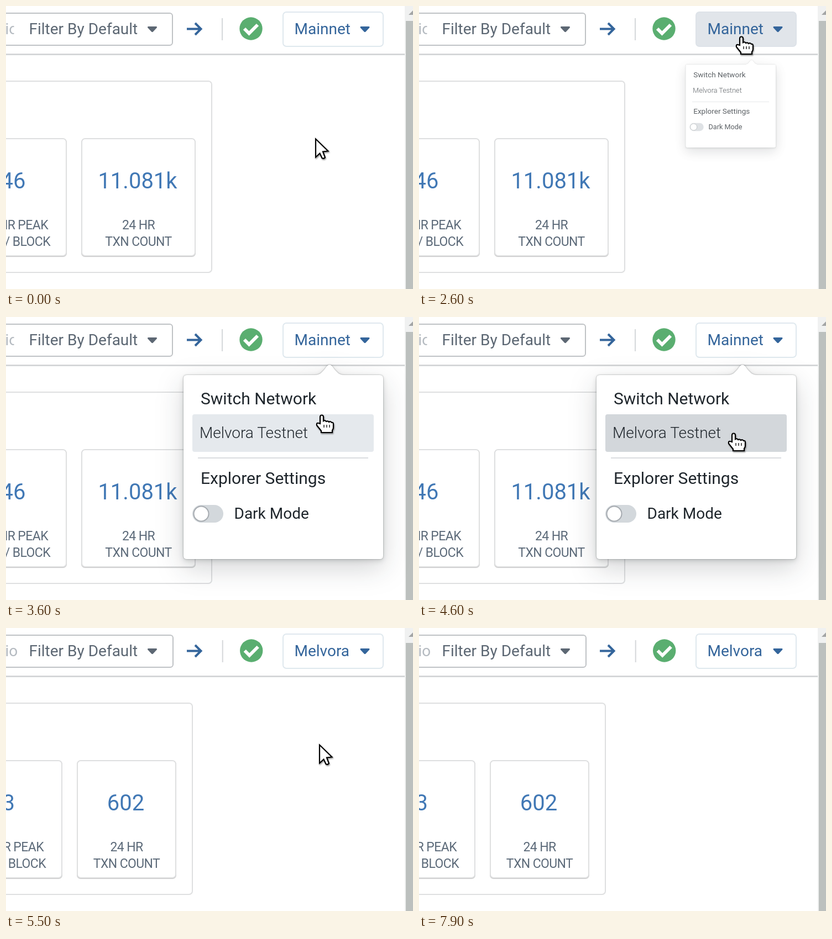
Recreate the animation shown at these times as an HTML page. Size 736 by 512 pixels, loop 8.6 s.

```html
<!DOCTYPE html>
<html lang="en">
<head>
<meta charset="utf-8">
<title>Network switch</title>
<style>
  html, body { margin: 0; width: 100%; height: 100%; overflow: hidden; background: #fff; }
  svg { display: block; font: 28px Roboto, sans-serif; }
  .box { fill: #fff; stroke: #dedfe0; stroke-width: 2; }
  .card { filter: drop-shadow(0 1px 0.5px rgba(0, 0, 0, .22)); }
  .num { font-size: 40px; fill: #4178b5; }
  .label { font-size: 23px; letter-spacing: -.6px; fill: #5c6a79; }
  .mid { text-anchor: middle; }
  .end { text-anchor: end; }
  .grey { fill: #5c6773; }
  .blue { fill: #34659b; }
  #panel { fill: #1f262c; }
  #panel .head { font-size: 30px; }
  #sheet { fill: #fff; filter: drop-shadow(0 0 1px rgba(16, 22, 26, .4)) drop-shadow(0 3px 4px rgba(16, 22, 26, .16)) drop-shadow(0 16px 24px rgba(16, 22, 26, .18)); }
  #cursor { fill: #fff; stroke: #000; stroke-width: 2.2; filter: drop-shadow(1.5px 2px 1px rgba(0, 0, 0, .4)); }
</style>
</head>
<body>
<svg width="736" height="512">
  <defs>
    <path id="caret" d="M1.5 0H15.5Q18 .5 16.5 2.5L10 9.5Q8.500 11 7 9.500L.5 2.500Q-1 .5 1.500 0Z"/>
  </defs>
  <g id="page">
    <g id="cards">
      <rect id="outer" class="box" x="-20" y="136" height="346" rx="6"/>
      <g id="left">
        <rect class="box card" x="-100" y="240" width="209" height="212" rx="6"/>
        <text class="label end" x="76" y="404">24 HR PEAK</text>
        <text class="label end" x="80" y="434">TXN / BLOCK</text>
      </g>
      <rect id="right" class="box card" y="240" height="212" rx="6"/>
      <text id="peak" class="num end" y="330"></text>
      <g id="count" class="mid">
        <text id="total" class="num" x="-1.500" y="330"></text>
        <text class="label" y="404">24 HR</text>
        <text class="label" y="434">TXN COUNT</text>
      </g>
    </g>
    <rect y="86.500" width="721" height="2" fill="#c3c6c8"/>
    <rect y="88.500" width="721" height="1" fill="#eceded"/>
    <rect id="filter" x="-20" y="13" height="58" rx="5" fill="#fff" stroke="#bfc2c5" stroke-width="2"/>
    <text x="-1.500" y="51" fill="#b4bac0">io</text>
    <rect id="cover" y="15" width="24" height="54" fill="#fff"/>
    <text class="grey" x="41.500" y="51">Filter By Default</text>
    <use class="grey" href="#caret" x="256" y="37"/>
    <path d="M327 41.500H352M342 31L352.500 41.500L342 52" fill="none" stroke="#34659b" stroke-width="4"/>
    <g id="status">
      <rect x="390" y="22" width="2" height="40" fill="#d5d8da"/>
      <circle cx="443" cy="41" r="20.700" fill="#5aae70"/>
      <path d="M431 41L439.500 49.500L455 34" fill="none" stroke="#fff" stroke-width="6"/>
    </g>
    <rect id="button" x="501" y="11" width="181" height="62" rx="6" stroke-width="2"/>
    <text id="network" class="blue" x="521.500" y="51"></text>
    <use class="blue" href="#caret" x="640.500" y="37"/>
    <rect x="721" width="15" height="512" fill="#f0f1f1"/>
    <rect x="723" y="27" width="13" height="485" fill="#bcc0be"/>
    <path d="M728 16L736 8V16Z" fill="#a3a5a5"/>
  </g>
  <g id="panel">
    <path id="sheet" d="M327 105H558C567 105 571 101 578 92Q585 81 592 92C599 101 603 105 612 105H676Q682 105 682 111V432Q682 438 676 438H327Q321 438 321 432V111Q321 105 327 105Z"/>
    <rect id="item" x="337" y="176" width="328" height="68" rx="4"/>
    <text class="head" x="352" y="158">Switch Network</text>
    <text x="350" y="219" font-weight="300">Melvora Testnet</text>
    <rect x="347" y="254" width="308" height="2" fill="#dadde0"/>
    <text class="head" x="352" y="302">Explorer Settings</text>
    <rect x="337" y="340" width="56" height="32" rx="16" fill="#d3d8dc"/>
    <circle cx="353" cy="356" r="13.500" fill="#fff" stroke="#a6abb0" stroke-width="2"/>
    <text x="412.500" y="365">Dark Mode</text>
  </g>
  <g id="cursor">
    <path id="arrow" d="M1 2.500V35.500L8.500 28.500L12.500 37Q15.500 39 18 36L14 25.500L23.500 24.500Z"/>
    <g id="hand" transform="translate(-8)">
      <path d="M8 17V5Q8 1.500 11 1.500Q14 1.500 14 5V12Q17 10 19 13Q22 11.500 24 14Q27 12 29 15Q32 14 32 18V24Q32 27 30 29V33H10V30L2 20Q1 15 5 16Z"/>
      <path d="M15 19V24M20 19V24M25 19V24" stroke-width="1.300"/>
    </g>
  </g>
</svg>
<script>
const LOOP = 8600, STEP = 100;
const $ = id => document.getElementById(id);
const set = (id, attrs) => { for (const k in attrs) $(id).setAttribute(k, attrs[k]); };
const show = (id, on) => set(id, { visibility: on ? 'inherit' : 'hidden' });
const clamp = v => Math.max(0, Math.min(1, v));

// Pointer tip: time, x, y
const path = [
  [0, 559, 238], [1000, 559, 238], [1100, 560, 238], [1300, 560, 238], [1400, 560, 240],
  [1800, 560, 240], [1900, 557, 212], [2000, 561, 164], [2100, 568, 110], [2200, 576, 69],
  [2300, 580, 54], [3100, 580, 54], [3200, 579, 61], [3300, 577, 80], [3400, 574, 110],
  [3500, 570, 144], [3600, 568, 176], [3700, 566, 200], [3800, 566, 209], [7300, 566, 209],
  [7400, 566, 200], [7500, 567, 172], [7600, 569, 126], [7700, 572, 76], [7800, 574, 38],
  [LOOP, 574, 38]
];

function pointer(t) {
  const i = path.findIndex(p => p[0] > t);
  const [t0, x0, y0] = path[i - 1], [t1, x1, y1] = path[i];
  const u = (t - t0) / (t1 - t0);
  return [x0 + (x1 - x0) * u, y0 + (y1 - y0) * u];
}

// Cubic Bezier easing, solved by bisection
function bezier(u, ax, ay, bx, by) {
  const at = (s, a, b) => 3 * (1 - s) ** 2 * s * a + 3 * (1 - s) * s * s * b + s ** 3;
  let lo = 0, hi = 1;
  for (let i = 0; i < 24; i++) {
    const m = (lo + hi) / 2;
    if (at(m, ax, bx) < u) lo = m; else hi = m;
  }
  return at(hi, ay, by);
}

function layout(test) {
  set('outer', { width: test ? 357 : 392 });
  set('left', { transform: `translate(${test ? -8 : 0})` });
  set('right', { x: test ? 129 : 137, width: test ? 178 : 205 });
  set('peak', { x: test ? 16 : 35.5 });
  set('count', { transform: `translate(${test ? 218 : 239.5})` });
  set('filter', { width: test ? 322 : 321 });
  set('cover', { x: test ? 20.5 : 14.5 });
  set('status', { transform: `translate(${test ? 0.7 : 0})` });
  $('peak').textContent = test ? '3' : '46';
  $('total').textContent = test ? '602' : '11.081k';
  $('network').textContent = test ? 'Melvora' : 'Mainnet';
}

function draw(now) {
  const t = Math.floor(now % LOOP / STEP) * STEP;
  const [x, y] = pointer(t);
  const open = t >= 2600 && t < 4800;
  const loaded = t < 4800 || t >= 5300;
  const onButton = loaded && t < 7900 && y > 10 && y < 74;
  const onItem = open && y >= 176 && y < 244;

  layout(t >= 4800);
  show('page', loaded);
  show('cards', t < 4800 || t >= 5400);
  show('peak', t < 4800 || t >= 5500);
  show('total', t < 4800 || t >= 5500);
  set('button', { fill: onButton ? '#e1e5ea' : '#fff', stroke: onButton ? '#dde2e8' : '#dfe8ee' });

  const s = bezier(clamp((t - 2516) / 400), .54, 1.12, .38, 1.11);
  show('panel', open);
  set('panel', {
    transform: `translate(615 106) scale(${s}) translate(-615 -106)`,
    opacity: Math.min(1, s * 1.6)
  });
  set('item', { fill: !onItem ? 'none' : t >= 4600 ? '#d3d7db' : '#e5e9ed' });

  show('cursor', t < 7900);
  set('cursor', { transform: `translate(${x} ${y})` });
  show('hand', onButton || onItem);
  show('arrow', !onButton && !onItem);
}

const start = performance.now();
function tick() {
  draw(performance.now() - start);
  requestAnimationFrame(tick);
}
tick();
</script>
</body>
</html>
```
